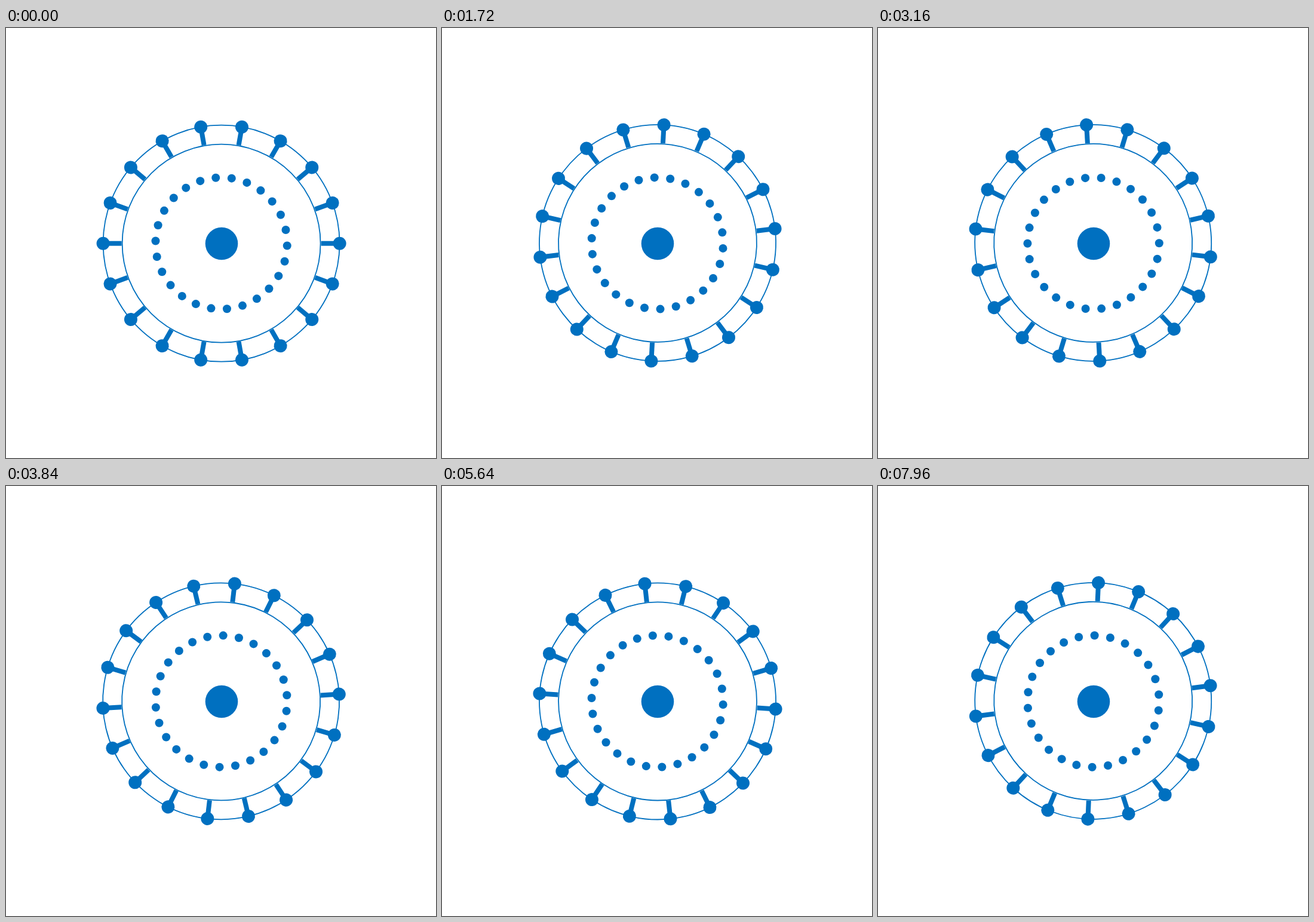
Write an HTML page with a canvas that moves like this. It is 720 px wide and 720 px high and loops after 8 s.

```html
<!DOCTYPE html>
<html lang="en">
<head>
<meta charset="utf-8">
<title>Counter-rotating rings</title>
<style>
  html, body { margin: 0; width: 100%; height: 100%; overflow: hidden; background: #fff; }
  canvas { display: block; }
</style>
</head>
<body>
<canvas id="stage" width="720" height="720"></canvas>
<script>
const ctx = document.getElementById("stage").getContext("2d");
const TAU = Math.PI * 2;
const LOOP = 8000;
const STEP = 40;
const SPEED = 73.8 * Math.PI / 180; // radians per second
const BLUE = "#0070c0";

const WHEEL = { x: 360.6, y: 360.2, wobble: 0.5, count: 18, inner: 166, outer: 198, ball: 11, spoke: 8 };
const DOTS = { x: 360.6, y: 360.5, count: 26, radius: 110.2, size: 7, start: 8.97 * Math.PI / 180 - TAU / 4 };
const HUB = { x: 361, y: 361, size: 27.3 };

function disc(x, y, r) {
  ctx.beginPath();
  ctx.arc(x, y, r, 0, TAU);
  ctx.fill();
}

function ring(r) {
  ctx.lineWidth = 1.8;
  ctx.beginPath();
  ctx.arc(0, 0, r, 0, TAU);
  ctx.stroke();
}

function drawWheel(turn) {
  ctx.save();
  ctx.translate(WHEEL.x, WHEEL.y);
  ctx.rotate(turn);
  ctx.translate(0, WHEEL.wobble); // slightly off-centre pivot
  ring(WHEEL.inner);
  ring(WHEEL.outer);
  for (let i = 0; i < WHEEL.count; i++) {
    ctx.fillRect(WHEEL.inner + 1, -WHEEL.spoke / 2, WHEEL.outer - WHEEL.inner - 1, WHEEL.spoke);
    disc(WHEEL.outer, 0, WHEEL.ball);
    ctx.rotate(TAU / WHEEL.count);
  }
  ctx.restore();
}

function drawDots(turn) {
  for (let i = 0; i < DOTS.count; i++) {
    const a = DOTS.start + turn + i * TAU / DOTS.count;
    disc(DOTS.x + DOTS.radius * Math.cos(a), DOTS.y + DOTS.radius * Math.sin(a), DOTS.size);
  }
}

function draw() {
  const time = performance.now() % LOOP;
  const turn = SPEED * Math.floor(time / STEP + 0.001) * STEP / 1000;
  ctx.fillStyle = "#fff";
  ctx.fillRect(0, 0, 720, 720);
  ctx.fillStyle = ctx.strokeStyle = BLUE;
  drawWheel(-turn);
  drawDots(turn);
  disc(HUB.x, HUB.y, HUB.size);
  requestAnimationFrame(draw);
}

draw();
</script>
</body>
</html>
```
